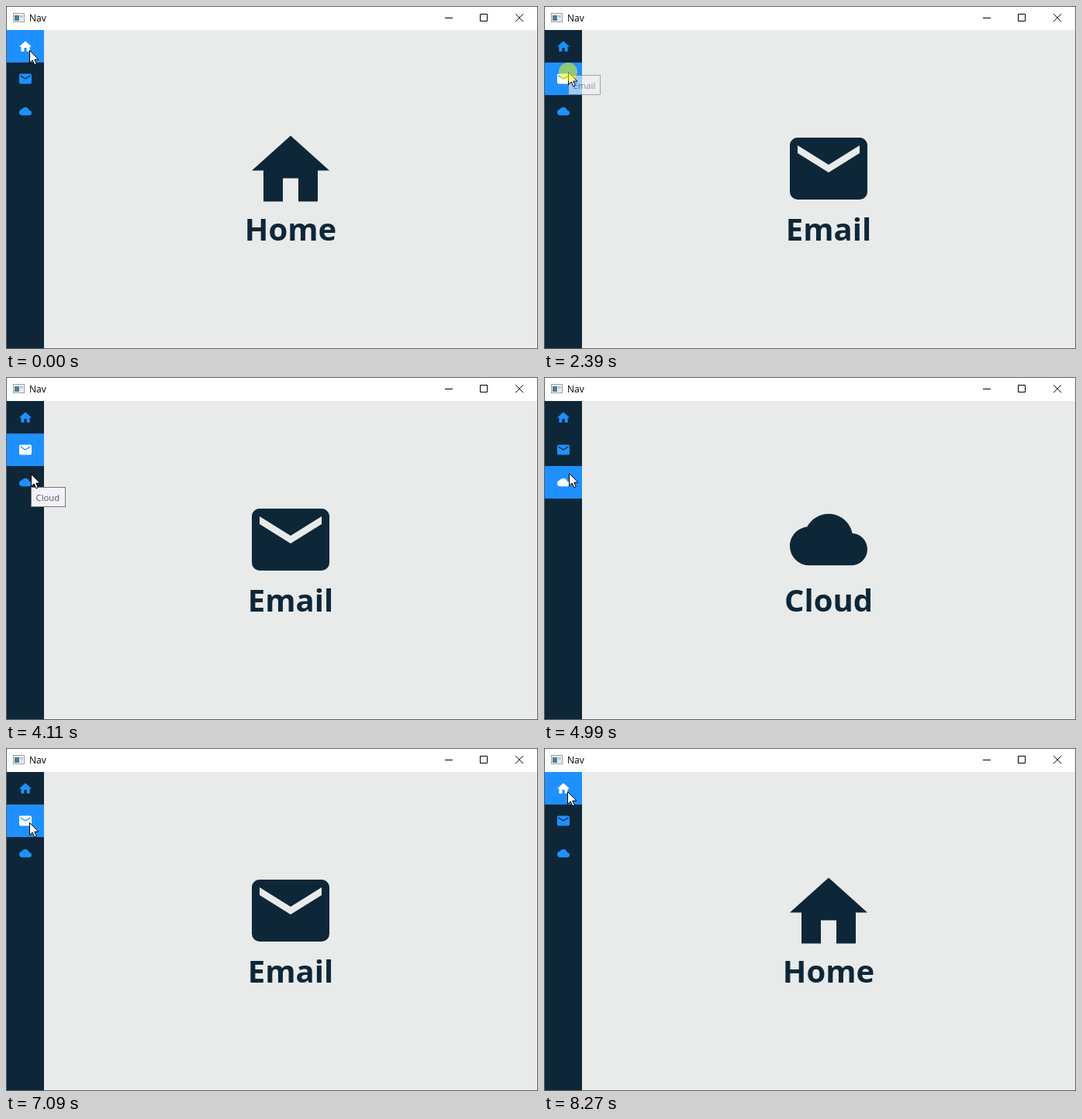
Animation, 686 px wide and 443 px high, one loop 8.81 s. Source, as an HTML page:

```html
<!DOCTYPE html>
<html lang="en">
<head>
<meta charset="utf-8">
<title>Nav</title>
<style>
  html, body { margin: 0; width: 100%; height: 100%; overflow: hidden; background: #e8ebea; }
  svg { display: block; width: 686px; height: 443px; }
  text { font-family: "Open Sans", "Noto Sans", sans-serif; }
  .title { font-size: 12px; fill: #000; }
  .heading { font-size: 40px; font-weight: 700; fill: #0e2738; text-anchor: middle; }
  .tip rect { fill: #f2f2f8; stroke: #767676; }
  .tip text { font-size: 11.3px; fill: #575757; }
</style>
</head>
<body>
<svg viewBox="0 0 686 443" xmlns="http://www.w3.org/2000/svg">
  <rect width="686" height="443" fill="#5f6163"/>
  <rect x="1" y="1" width="684" height="30" fill="#fff"/>
  <rect x="1" y="31" width="684" height="411" fill="#e8ebea"/>
  <rect x="1" y="31" width="48" height="411" fill="#0e2738"/>

  <g shape-rendering="crispEdges">
    <rect x="9.5" y="9.5" width="14" height="11" fill="#f4f5f6" stroke="#9a9fa3"/>
    <rect x="11" y="12" width="6" height="7" fill="#4b7f92"/>
    <rect x="18" y="12" width="4" height="3" fill="#b9c6d6"/>
    <rect x="18" y="16" width="4" height="3" fill="#dfe3e8"/>
  </g>
  <text class="title" x="30" y="20">Nav</text>
  <g fill="none" stroke="#000">
    <path d="M566 15.5H576M611.5 10.5H620.5V19.5H611.5Z"/>
    <path d="M657 10.2L667 20.2M667 10.2L657 20.2"/>
  </g>

  <rect id="mark" x="1" width="48" height="42" fill="#1e90ff"/>
  <g id="menu"></g>
  <g id="page"><path fill="#0e2738"/><text class="heading" x="367" y="303"></text></g>
  <g id="tips"></g>
  <path id="arrow" d="M.5 .5V16.6L4.2 13L6.8 18.8L9.3 17.7L6.8 12.1H11.9Z" fill="#fff" stroke="#000"/>
  <circle id="press" r="12" fill="#ff0" fill-opacity=".5"/>
</svg>
<script>
const LOOP = 8810;
const NS = "http://www.w3.org/2000/svg";
const $ = id => document.getElementById(id);

// width and mid are in icon units; the icons share a 24-unit grid
const items = [
  { name: "Home", width: 20, mid: 11.5,
    d: "M10 20V14H14V20H19V12H22L12 3L2 12H5V20Z" },
  { name: "Email", width: 20, mid: 12,
    d: "M20 8L12 13L4 8V6L12 11L20 6M20 4H4C2.89 4 2 4.89 2 6V18A2 2 0 0 0 4 20H20A2 2 0 0 0 22 18V6C22 4.89 21.1 4 20 4Z" },
  { name: "Cloud", width: 24, mid: 12,
    d: "M19.35 10.03C18.67 6.59 15.64 4 12 4C9.11 4 6.6 5.64 5.35 8.03C2.34 8.36 0 10.9 0 14A6 6 0 0 0 6 20H19A5 5 0 0 0 24 15C24 12.36 21.95 10.22 19.35 10.03Z" }
];

// [time, selected item]
const picks = [[0, 0], [2300, 1], [4200, 2], [6170, 1], [8100, 0]];

// pointer moves: first step, last step, number of steps, end point
const start = [30, 57];
const moves = [
  { from: 1620, to: 2070, n: 7, end: [31, 85] },
  { from: 3180, to: 3810, n: 9, end: [32, 125] },
  { from: 4990, to: 4990, n: 1, end: [32, 124] },
  { from: 5140, to: 5140, n: 1, end: [32, 123] },
  { from: 5300, to: 5610, n: 5, end: [30, 104] },
  { from: 5780, to: 5860, n: 2, end: [30, 102] },
  { from: 6940, to: 7564, n: 9, end: [30, 56] }
];

// tooltips with [time, opacity] steps
const tips = [
  { item: 0, x: 30, y: 74, w: 46, fade: [[230, .6], [300, 1], [1770, 0]] },
  { item: 1, x: 31, y: 89, w: 42, fade: [[1845, .5], [1920, 1], [2300, .85], [2390, .6], [2470, .25], [2540, 0]] },
  { item: 2, x: 32, y: 142, w: 45, fade: [[4040, .6], [4110, 1], [4200, .65], [4270, .3], [4350, 0]] },
  { item: 1, x: 30, y: 119, w: 42, fade: [[5930, .6], [6010, 1], [6170, .65], [6250, .3], [6330, 0]] },
  { item: 0, x: 30, y: 73, w: 46, fade: [[7640, .4], [7720, .75], [7800, 1], [8100, .65], [8180, .3], [8270, 0]] }
];

const presses = [[2300, 2540], [4200, 4350], [6170, 6330], [8100, 8270]];

function add(parent, tag, attrs) {
  const el = document.createElementNS(NS, tag);
  for (const key in attrs) el.setAttribute(key, attrs[key]);
  return parent.appendChild(el);
}

function place({ width, mid }, cx, cy, size) {
  return `translate(${cx} ${cy}) scale(${size / width}) translate(-12 ${-mid})`;
}

function stepAt(steps, t, value) {
  for (const [time, v] of steps) if (t >= time) value = v;
  return value;
}

const ease = p => p * p * (3 - 2 * p);

function pointerAt(t) {
  let pos = start;
  for (const { from, to, n, end } of moves) {
    if (t < from) break;
    const gap = (to - from) / (n - 1) || 1;
    const k = Math.min(n, Math.floor((t - from) / gap) + 1);
    const p = ease(k / n), last = pos;
    pos = last.map((v, i) => Math.round(v + (end[i] - v) * p));
  }
  return pos;
}

const icons = items.map((item, i) =>
  add($("menu"), "path", { d: item.d, transform: place(item, 25, 52 + 42 * i, 16) }));

const tipEls = tips.map(({ item, x, y, w }) => {
  const g = add($("tips"), "g", { class: "tip", transform: `translate(${x} ${y})` });
  add(g, "rect", { x: .5, y: .5, width: w - 1, height: 25 });
  add(g, "text", { x: 6.5, y: 18 }).textContent = items[item].name;
  return g;
});

const [bigIcon, heading] = $("page").children;
let shown = -1;

function select(i) {
  if (i === shown) return;
  shown = i;
  $("mark").setAttribute("y", 31 + 42 * i);
  icons.forEach((el, k) => el.setAttribute("fill", k === i ? "#fff" : "#1e90ff"));
  bigIcon.setAttribute("d", items[i].d);
  bigIcon.setAttribute("transform", place(items[i], 367, 210, 100));
  heading.textContent = items[i].name;
}

function draw(t) {
  select(stepAt(picks, t, 0));
  tipEls.forEach((el, i) => el.setAttribute("opacity", stepAt(tips[i].fade, t, 0)));
  const at = `translate(${pointerAt(t).join(" ")})`;
  $("arrow").setAttribute("transform", at);
  $("press").setAttribute("transform", at);
  const down = presses.some(([a, b]) => t >= a && t < b);
  $("press").setAttribute("visibility", down ? "visible" : "hidden");
}

const begin = performance.now();
function tick() {
  draw((performance.now() - begin) % LOOP);
  requestAnimationFrame(tick);
}
tick();
</script>
</body>
</html>
```
